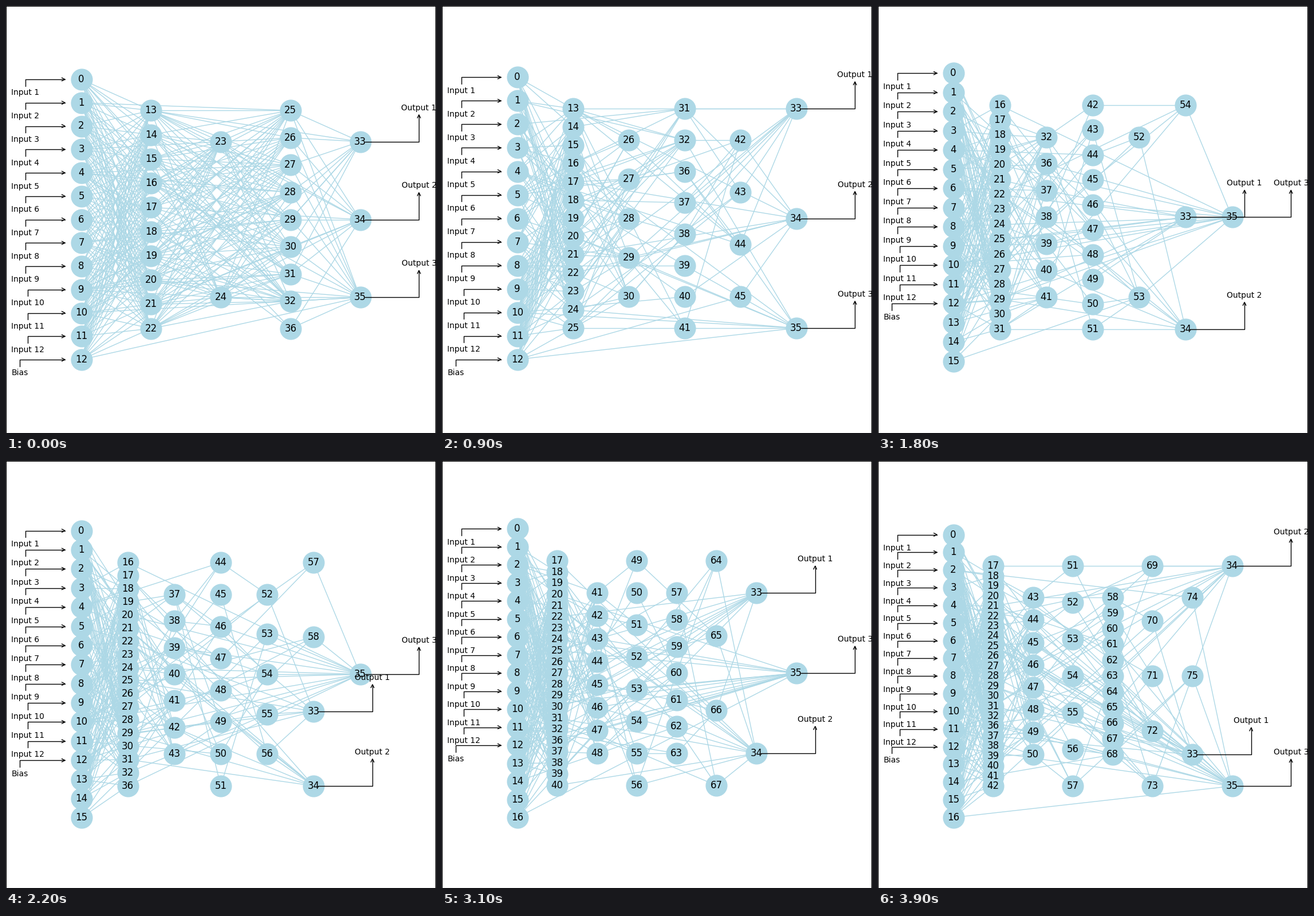
Recreate the animation shown at these times as a matplotlib script. Size 751 px wide and 745 px high, loop 4 s.

```python
import numpy as np
import matplotlib.pyplot as plt
from matplotlib.animation import FuncAnimation
from matplotlib.collections import LineCollection
from matplotlib.patches import FancyArrowPatch
from matplotlib.path import Path

W, H, DPI = 751, 745, 100
FRAMES, INTERVAL = 40, 100
BLUE = "lightblue"
LEFT, RIGHT = 131.5, 618.5
INPUTS = 13
OUTPUTS = (33, 34, 35)
MAX_COLUMNS = 7

# step: nodes per column, column shift of each output, top and bottom of the first column
STAGES = {
    0: ([13, 10, 2, 9], (0, 0, 0), 128, 617),
    5: ([13, 12, 4, 10], (0, 0, 0), 125, 616.6),
    13: ([13, 13, 7, 5, 8, 1], (-1, -1, 0), 123.8, 616.8),
    18: ([16, 16, 7, 10, 2, 1], (-1, -1, 0), 117.2, 619.6),
    26: ([15, 20, 7, 7, 8, 3], (0, 0, 1), 126, 625.2),
    31: ([17, 21, 8, 8, 7, 4], (0, 0, 1), 118.3, 622),
    39: ([17, 23, 8, 7, 11, 5, 2], (-1, 0, 0), 128.5, 622),
}

STEPS = np.array(list(STAGES))
DRAW = np.random.default_rng(11).random((80, 80))


def blend(step, pick):
    return np.interp(step, STEPS, [pick(s) for s in STAGES.values()])


def column_sizes(step):
    """Blend the stages; rounding the running total keeps one new node per step."""
    sums = [blend(step, lambda s: sum(s[0][:k + 1])) for k in range(MAX_COLUMNS)]
    sizes = np.diff(np.floor(np.array(sums) + 0.5), prepend=0).astype(int)
    return [n for n in sizes if n > 0]


def layout(step):
    """Return the column and the position of every node."""
    sizes = column_sizes(step)
    labels = (n for n in range(100) if n not in OUTPUTS)
    columns = [[next(labels) for _ in range(n)] for n in sizes]
    nearest = STEPS[np.argmin(abs(STEPS - step))]
    for node, shift in zip(OUTPUTS, STAGES[nearest][1]):
        k = len(sizes) + shift
        while len(columns) <= k:
            columns.append([])
        columns[k].append(node)

    top, bottom = blend(step, lambda s: s[2]), blend(step, lambda s: s[3])
    inset = (bottom - top) / 9
    xs = np.linspace(LEFT, RIGHT, len(columns))
    col, pos = {}, {}
    for k, nodes in enumerate(columns):
        pad = inset * (0 if k == 0 else 2 - k % 2)
        if len(nodes) == 1:
            ys = [(top + bottom) / 2]
        else:
            ys = np.linspace(top + pad, bottom - pad, len(nodes))
        for node, y in zip(nodes, ys):
            col[node], pos[node] = k, (xs[k], y)
    return col, pos


def chance(a, b, to_output, early):
    """Probability of a connection from column a to column b."""
    if to_output:
        if a == 0:
            return 0.03
        return 0.28 if a < 3 else 0.08 + 0.75 * early
    if a == 0:
        return 0.33 + 0.6 * early if b == 1 else 0.02 + 0.12 * early
    return 0.75 * early ** (b - 1) + 0.12 / (b - 1) ** 2


def connections(step, col):
    early = np.exp(-step / 12)
    edges = set()
    for i in col:
        if i in OUTPUTS:
            continue
        for j in col:
            if col[i] >= col[j]:
                continue
            p = chance(col[i], col[j], j in OUTPUTS, early)
            if any(n > OUTPUTS[-1] and col[n] > 2 for n in (i, j)):
                p *= 0.3
            if DRAW[i, j] < p:
                edges.add((i, j))

        # every later node splits a connection: one way in, one way out
        if col[i] > 1:
            before = [n for n in col if col[n] < col[i] and n not in OUTPUTS]
            after = [n for n in col if col[n] > col[i]]
            edges.add((before[int(DRAW[i, 0] * len(before))], i))
            edges.add((i, after[int(DRAW[i, 1] * len(after))]))
    return sorted(edges)


def arrow(points):
    ax.add_patch(FancyArrowPatch(path=Path(points), arrowstyle="->",
                                 mutation_scale=10, lw=1, color="black",
                                 fill=False, zorder=3))


def draw_input(n, y):
    text = f"Input {n + 1}" if n < INPUTS - 1 else "Bias"
    x = 24 if n == INPUTS - 1 else 34 if n < 9 else 38
    ax.text(9.4, y + 23.5, text, fontsize=10, ha="left", va="center")
    arrow([(x, y + 11.5), (x, y), (104.5, y)])


def draw_output(n, x, y):
    end = x + 102.7
    ax.text(end, y - 59, f"Output {n}", fontsize=10, ha="center", va="center")
    arrow([(x + 8, y), (end, y), (end, y - 48.5)])


def update(step):
    ax.clear()
    col, pos = layout(step)

    lines = [(pos[i], pos[j]) for i, j in connections(step, col)]
    ax.add_collection(LineCollection(lines, colors=BLUE, linewidths=1, zorder=1))
    ax.scatter(*zip(*pos.values()), s=700, c=BLUE, zorder=2)
    for node, (x, y) in pos.items():
        ax.text(x, y, str(node), fontsize=12, ha="center", va="center")

    for n in range(INPUTS):
        draw_input(n, pos[n][1])
    for n, node in enumerate(OUTPUTS, 1):
        draw_output(n, *pos[node])
    ax.set(xlim=(0, W - 1), ylim=(H, 0), xticks=[], yticks=[])
    return []


fig = plt.figure(figsize=(W / DPI, H / DPI), dpi=DPI, facecolor="white")
# one pixel narrower, so that the right border stays on the stage
ax = fig.add_axes([0, 0, (W - 1) / W, 1])
anim = FuncAnimation(fig, update, frames=FRAMES, interval=INTERVAL,
                     repeat=True, repeat_delay=0, blit=False)
plt.show()
```
